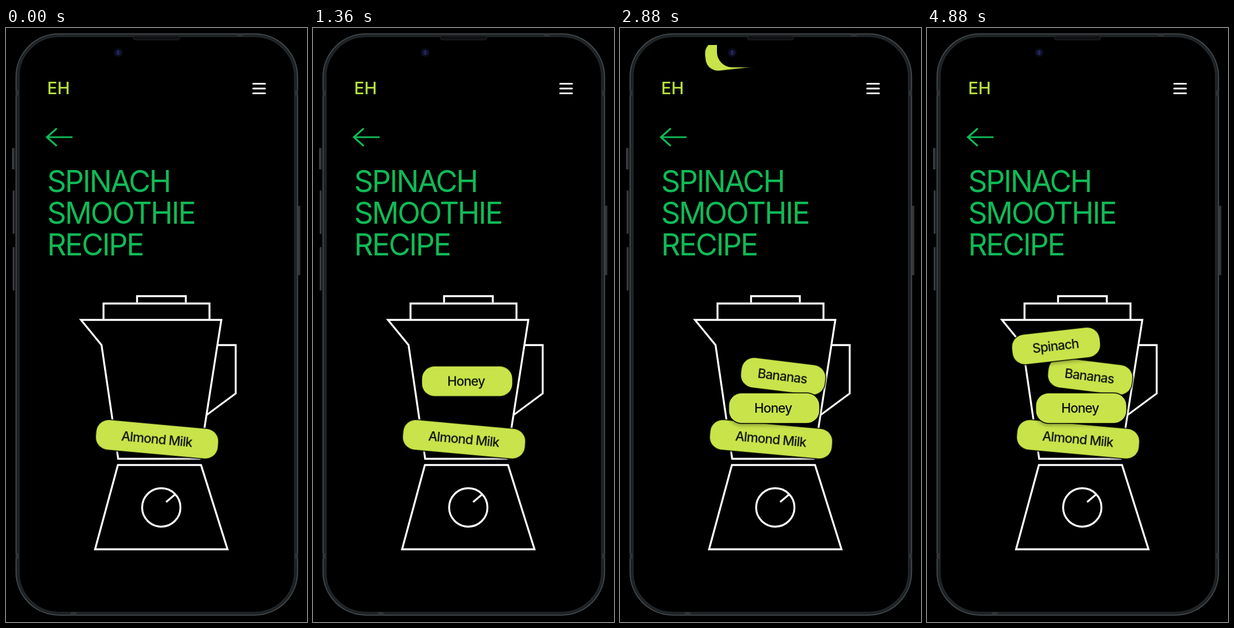
These frames come from a looping animation (534x1050 px, 4.96 s). An HTML page without scripts:

```html
<!DOCTYPE html>
<html lang="en">
<head>
<meta charset="utf-8">
<title>Spinach smoothie recipe</title>
<style>
  html, body { margin: 0; width: 100%; height: 100%; overflow: hidden; background: #000; }
  svg { display: block; width: 100vw; height: 100vh; }
  text { font-family: Inter, "Liberation Sans", sans-serif; }

  .brand { font-size: 30px; font-weight: 500; fill: #b8e23f; }
  .title { font-size: 53px; font-weight: 400; letter-spacing: -2.4px; fill: #10ba56; }
  .line { fill: none; stroke: #fff; stroke-width: 3.4; }

  .pill { filter: drop-shadow(0 3px 3px rgba(0, 0, 0, .3)); }
  .pill rect { fill: #c8e44a; stroke: #000; stroke-width: 3; paint-order: stroke; }
  .pill text {
    font-size: 23px; font-weight: 500; letter-spacing: -.9px;
    text-anchor: middle; fill: #0c0f08;
  }

  /* Each pill waits above the screen, then drops and slows to rest. */
  .drop { animation: 4960ms linear infinite; }
  .honey { --from: translateY(-672px); animation-name: honey; }
  .bananas { --from: translateY(-625px); animation-name: bananas; }
  .spinach { --from: translateY(-570px); animation-name: spinach; }
  @keyframes honey {
    0% { transform: var(--from); }
    17.54% { transform: var(--from); animation-timing-function: cubic-bezier(.333, .667, .667, 1); }
    31.03%, 100% { transform: translateY(0); }
  }
  @keyframes bananas {
    0% { transform: var(--from); }
    35.73% { transform: var(--from); animation-timing-function: cubic-bezier(.333, .667, .667, 1); }
    50.24%, 100% { transform: translateY(0); }
  }
  @keyframes spinach {
    0% { transform: var(--from); }
    57.36% { transform: var(--from); animation-timing-function: cubic-bezier(.333, .667, .667, 1); }
    73.2%, 100% { transform: translateY(0); }
  }
</style>
</head>
<body>
<svg viewBox="0 0 534 1050" preserveAspectRatio="none">
  <defs>
    <clipPath id="screen"><rect x="25" y="30" width="485" height="1000"/></clipPath>
    <radialGradient id="lens">
      <stop offset="0" stop-color="#20245c"/>
      <stop offset=".5" stop-color="#11132c"/>
      <stop offset="1" stop-color="#000"/>
    </radialGradient>
    <linearGradient id="key">
      <stop offset="0" stop-color="#4a4d50"/>
      <stop offset="1" stop-color="#1a1c1e"/>
    </linearGradient>
  </defs>
  <rect width="534" height="1050"/>

  <!-- Header -->
  <text class="brand" x="73" y="117">EH</text>
  <path class="line" stroke-linecap="round" d="M438.5 98.5h21M438.5 107h21M438.5 115.5h21" style="stroke-width:3"/>
  <path d="M118 193H72.5M90 177.5L72.5 193L90 208.5" fill="none" stroke="#10ba56" stroke-width="3.2"/>
  <g class="title">
    <text x="73" y="290">SPINACH</text>
    <text x="73" y="346">SMOOTHIE</text>
    <text x="73" y="402">RECIPE</text>
  </g>

  <!-- Blender -->
  <g class="line">
    <path d="M232.5 485V474H319V485"/>
    <path d="M173 516V487H361V516"/>
    <path d="M133 516H382L343.500 761.500H199L169.500 560.500Z"/>
    <path d="M375 560.500H407.500V646L356 684"/>
    <path d="M198.500 772.500H346L393 921.500H158Z"/>
    <circle cx="275.500" cy="847.500" r="34"/>
    <path d="M284 838L300 824.500"/>
  </g>

  <!-- Ingredients -->
  <g clip-path="url(#screen)">
    <g class="pill" transform="translate(268 727) rotate(5.2)">
      <rect x="-108.500" y="-26.250" width="217" height="52.500" rx="22"/>
      <text x="-.5" y="8">Almond Milk</text>
    </g>
    <g class="drop bananas">
      <g class="pill" transform="translate(289.500 615.700) rotate(7)">
        <rect x="-74.750" y="-26.250" width="149.500" height="52.500" rx="22"/>
        <text x="-1.500" y="8">Bananas</text>
      </g>
    </g>
    <g class="drop honey">
      <g class="pill" transform="translate(273.500 672)">
        <rect x="-80" y="-26.250" width="160" height="52.500" rx="22"/>
        <text x="-2" y="8">Honey</text>
      </g>
    </g>
    <g class="drop spinach">
      <g class="pill" transform="translate(229 562) rotate(-6.4)">
        <rect x="-78" y="-26.250" width="156" height="52.500" rx="22"/>
        <text x="-1" y="8">Spinach</text>
      </g>
    </g>
  </g>

  <!-- Notch -->
  <rect x="172" y="-40" width="190" height="109.500" rx="27"/>
  <circle cx="199" cy="43.500" r="9" fill="url(#lens)"/>
  <path d="M199 40.500v1.500M199 45v1.500" stroke="#4650a8" stroke-width="1.500"/>

  <!-- Phone body -->
  <g fill="none">
    <rect x="20.500" y="13" width="494" height="1022" rx="73" stroke="#1e2224" stroke-width="6"/>
    <rect x="17.800" y="10.300" width="499.500" height="1027.500" rx="76" stroke="#454b4f" stroke-width="1.800"/>
    <rect x="23.500" y="15.500" width="488" height="1017" rx="70" stroke="#25292c" stroke-width="1.200"/>
    <path d="M410 12h10M115 1035h10M19.500 110v10M515.500 110v10M19.500 928v10M515.500 928v10" stroke="#303437" stroke-width="5"/>
  </g>
  <rect x="226" y="14" width="82" height="7" rx="3.500" fill="#101113" stroke="#232527"/>
  <g fill="url(#key)">
    <rect x="11" y="212" width="5" height="38" rx="1.500"/>
    <rect x="12" y="287" width="4" height="77" rx="1.500"/>
    <rect x="12" y="387" width="4" height="77" rx="1.500"/>
    <rect x="518.500" y="314" width="4" height="123" rx="1.500"/>
  </g>
</svg>
</body>
</html>
```
